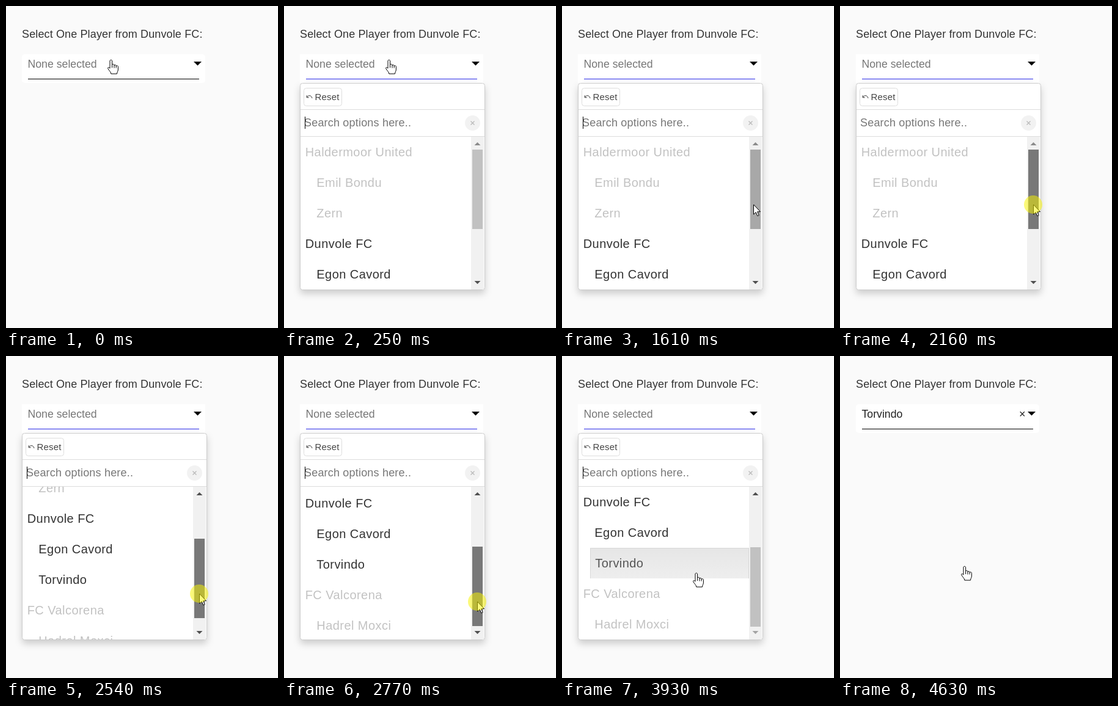
Write an HTML page that moves like this. It is 445 px wide and 527 px high and loops after 4.7 s.

```html
<!DOCTYPE html>
<html lang="en">
<head>
<meta charset="utf-8">
<title>Grouped select</title>
<style>
  html, body { margin: 0; width: 100%; height: 100%; overflow: hidden; background: #fafafa; }
  svg { display: block; font: 18px "Liberation Sans", Arial, sans-serif; }
  .title { letter-spacing: .13px; }
  .spaced { letter-spacing: .19px; }
  .panel { fill: #fff; stroke: #ccc; filter: drop-shadow(0 6px 6px rgba(0, 0, 0, .175)); }
  .rule { stroke: #ddd; }
  .hint { fill: #777; }
  #value { font-size: 17.7px; }
  #list text { font-size: 20px; letter-spacing: .44px; }
  .cursor { fill: #fff; stroke: #000; stroke-linejoin: round; }
</style>
</head>
<body>
<svg width="445" height="527" viewBox="0 0 445 527">
  <defs>
    <clipPath id="viewport"><rect x="27" y="214" width="279" height="250"/></clipPath>
    <linearGradient id="hoverFill" x2="0" y2="1">
      <stop stop-color="#e6e6e6"/><stop offset="1" stop-color="#eee"/>
    </linearGradient>
  </defs>

  <text class="title" x="26" y="52" fill="#333">Select One Player from Dunvole FC:</text>

  <rect id="field" x="26" y="79" width="300" height="47" fill="#fff"/>
  <path id="underline" d="M36 119.5H316"/>
  <path d="M307 91H320L313.5 97.5Z"/>
  <text id="value" x="35.5" y="101"></text>
  <text id="clear" x="293" y="101" fill="#222">×</text>

  <g id="dropdown">
    <rect class="panel" x="26.5" y="126.5" width="302" height="338" rx="4"/>
    <path class="rule" d="M27 169.5H328M27 213.5H328"/>
    <rect x="32.5" y="134.5" width="62" height="29" rx="4" fill="#fff" stroke="#ddd"/>
    <path d="M37.5 149.5C39 145.5 45 145.5 46 151M37.2 146.3V149.8H40.7" fill="none" stroke="#333"/>
    <text class="spaced" x="50.5" y="154" font-size="15" fill="#444">Reset</text>
    <text class="spaced hint" x="33" y="197">Search options here..</text>
    <path id="caret" d="M34.5 181V201" stroke="#000"/>
    <circle cx="308.5" cy="191.5" r="12.5" fill="#f2f2f2"/>
    <path d="M305.5 188.5l6 6m0-6l-6 6" stroke="#bbb" stroke-width="1.4"/>

    <g clip-path="url(#viewport)"><g id="list"></g></g>

    <rect x="306" y="214" width="21" height="250" fill="#f1f1f1"/>
    <path id="arrowUp" d="M311.5 228H321.5L316.5 223Z"/>
    <path id="arrowDown" d="M311.5 450H321.5L316.5 455Z"/>
    <rect id="thumb" x="308" width="17" height="130"/>
  </g>

  <g id="pointer">
    <path id="arrow" class="cursor" d="M.5 0V16L4.2 12.6L6.8 18.6L9.2 17.5L6.7 11.7H11.5Z"/>
    <path id="hand" class="cursor" d="M-2 14V2C-2-.3 1.6-.3 1.6 2V8.5C1.6 6.8 5 6.8 5 8.8V9.6C5 7.8 8.2 8 8.2 10V10.8C8.2 9 11.4 9.3 11.4 11.3V16C11.4 19 9.5 20 9.5 23H-.2C-.2 20-2.5 19-5 14.8C-6.4 12.4-4 11.6-2 14ZM1.6 8.5V13M5 9.6V13.5M8.2 10.8V13.5"/>
    <circle id="press" r="15" fill="rgba(248,244,0,.52)"/>
  </g>
</svg>
<script>
const LOOP = 4700, ROW = 50, LIST_TOP = 214, THUMB_TOP = 235, THUMB_TRAVEL = 78, MAX_SCROLL = 150;
const options = [
  ['Haldermoor United', 0, true], ['Emil Bondu', 1, true], ['Zern', 1, true],
  ['Dunvole FC', 0, false], ['Egon Cavord', 1, false], ['Torvindo', 1, false],
  ['FC Valcorena', 0, true], ['Hadrel Moxci', 1, true]
];
const pickIndex = 5;

const $ = id => document.getElementById(id);
const set = (id, attrs) => Object.entries(attrs).forEach(([k, v]) => $(id).setAttribute(k, v));
const show = (id, on) => set(id, { visibility: on ? 'inherit' : 'hidden' });
const within = (v, from, to) => v >= from && v < to;
const linear = k => k;
const easeIn = p => k => k ** p;
const easeOut = p => k => 1 - (1 - k) ** p;

// Pointer moves, each held in equal steps from start to end.
const home = [172, 88];
const moves = [
  { start: 630, end: 850, steps: 4, x: 172, y: 323, ease: easeOut(1.3) },
  { start: 1150, end: 1610, steps: 7, x: 313, y: 325, ease: easeIn(1.12) },
  { start: 1690, end: 1860, steps: 3, x: 316, y: 325, ease: linear },
  { start: 2240, end: 2620, steps: 6, x: 316, y: 396, ease: easeOut(1.3) },
  { start: 2690, end: 3150, steps: 7, x: 316, y: 416, ease: linear },
  { start: 3240, end: 3241, steps: 1, x: 316, y: 423, ease: linear },
  { start: 3710, end: 4160, steps: 7, x: 204, y: 344, ease: easeOut(2.3) }
];

function pointerAt(t) {
  let [x, y] = home;
  for (const m of moves) {
    if (t < m.start) break;
    const step = Math.floor((t - m.start) / (m.end - m.start) * (m.steps - 1) + .15);
    const k = m.ease(Math.min(1, (step + 1) / m.steps));
    x += (m.x - x) * k;
    y += (m.y - y) * k;
  }
  return [Math.round(x), Math.round(y)];
}

$('list').innerHTML = options.map(([name, level, disabled], i) => {
  const top = LIST_TOP + i * ROW;
  const hover = i === pickIndex
    ? `<g id="hover"><rect x="46" y="${top}" width="260" height="${ROW}" fill="url(#hoverFill)"/>
       <path d="M46.5 ${top + ROW}V${top + .5}H305.5V${top + ROW}" fill="none" stroke="#d8d8d8"/></g>` : '';
  return `${hover}<text ${i === pickIndex ? 'id="pick"' : ''} x="${level ? 53.3 : 34.7}" y="${top + 32}"
    fill="${disabled ? '#c2c2c2' : '#333'}">${name}</text>`;
}).join('');

function draw(t) {
  const [x, y] = pointerAt(t);
  const open = within(t, 250, 4550), chosen = t >= 4550;
  const dragging = within(t, 2160, 3410);
  const travel = t < 2160 ? 0 : dragging ? Math.min(THUMB_TRAVEL, y - 325) : THUMB_TRAVEL;
  const thumbY = THUMB_TOP + travel;
  const overThumb = within(x, 308, 325) && within(y, thumbY, thumbY + 130);
  const rowY = LIST_TOP + pickIndex * ROW - MAX_SCROLL;
  const hovering = t >= 3710 && within(x, 46, 306) && within(y, rowY, rowY + ROW);

  set('field', { rx: within(t, 80, 4550) ? 0 : 5 });
  set('underline', { stroke: within(t, 80, 4550) ? '#2a2ae6' : '#000' });
  $('value').textContent = chosen ? options[pickIndex][0] : 'None selected';
  set('value', { fill: chosen ? '#222' : '#777' });
  show('clear', chosen);

  show('dropdown', open);
  show('caret', within(t, 250, 770) || within(t, 1310, 1770) || within(t, 2310, 3410) || t >= 3780);
  // Children set to "inherit" stay hidden with the closed dropdown.
  set('list', { transform: `translate(0 ${-Math.round(travel * MAX_SCROLL / THUMB_TRAVEL)})` });
  show('hover', hovering);
  set('pick', { x: hovering ? 54.3 : 53.3, fill: hovering ? '#555' : '#333' });
  set('thumb', { y: thumbY, fill: dragging ? '#787878' : overThumb ? '#a8a8a8' : '#c1c1c1' });
  set('arrowUp', { fill: travel ? '#505050' : '#8b8b8b' });
  set('arrowDown', { fill: travel < THUMB_TRAVEL ? '#505050' : '#a3a3a3' });

  const hand = t < 630 || hovering || chosen;
  set('pointer', { transform: `translate(${x} ${y})` });
  show('press', within(t, 80, 250) || dragging || within(t, 4470, 4630));
  show('hand', hand);
  show('arrow', !hand);
}

const began = performance.now();
function tick() {
  draw((performance.now() - began) % LOOP);
  requestAnimationFrame(tick);
}
tick();
</script>
</body>
</html>
```
